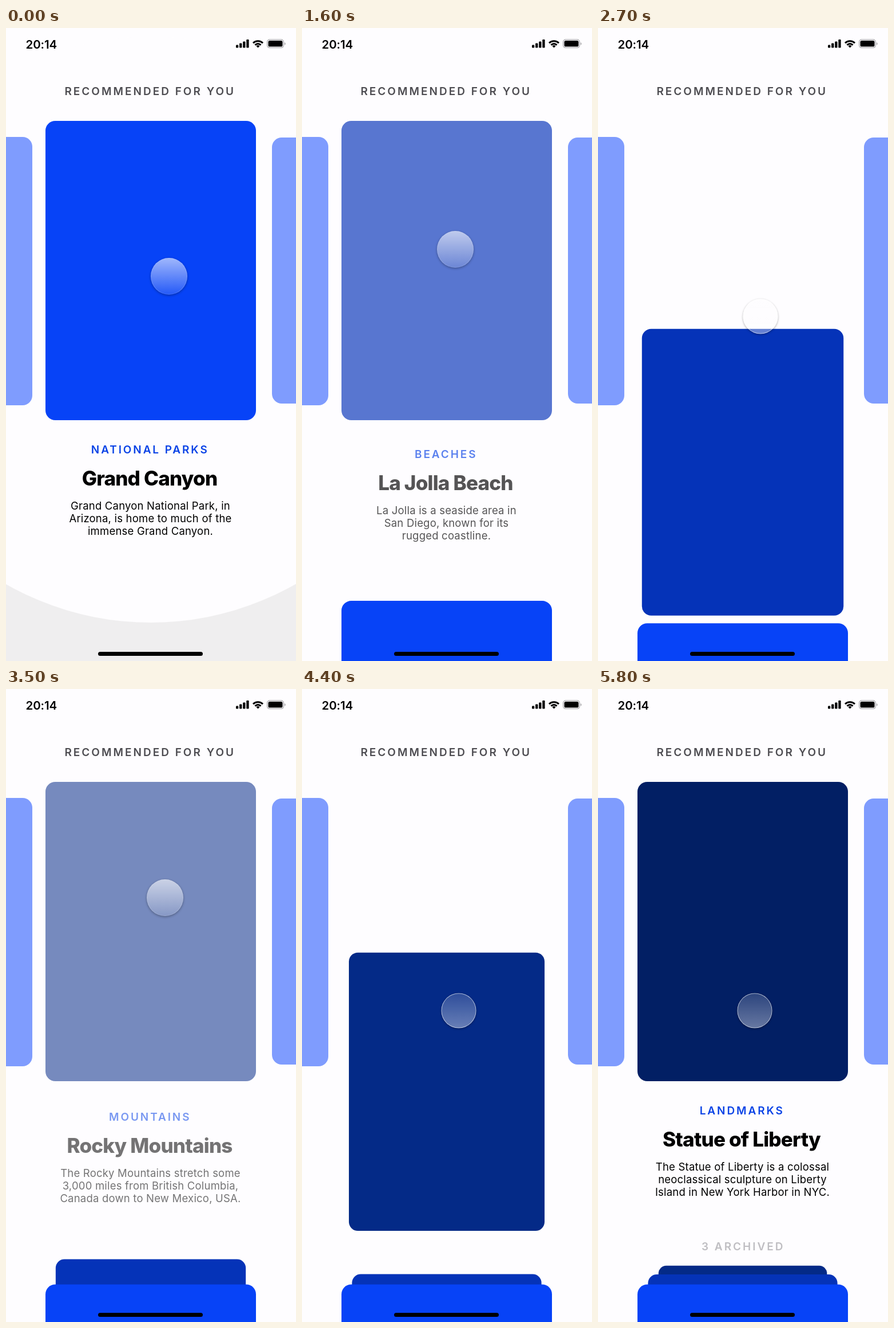
Write an HTML page that moves like this. It is 507 px wide and 1104 px high and loops after 5.9 s.

```html
<!DOCTYPE html>
<html lang="en">
<head>
<meta charset="utf-8">
<title>Recommended for you</title>
<style>
  html, body { margin: 0; width: 100%; height: 100%; overflow: hidden; background: #fefdff; }
  #stage {
    position: relative; width: 507px; height: 1104px; overflow: hidden;
    font-family: Inter, "Liberation Sans", sans-serif; color: #000;
  }
  #stage > * { position: absolute; }
  svg { left: 0; top: 0; }
  .caps {
    left: 0; width: 503.5px; height: 24px; line-height: 24px;
    text-align: center; font-size: 19px; letter-spacing: 3px; white-space: nowrap;
  }
  .header { top: 99px; font-weight: 600; color: #4d4c51; }
  .label { left: 2px; top: 961px; font-weight: 600; color: #bfbec2; }
  .time { left: 34.5px; top: 17px; line-height: 24px; font-size: 20.5px; font-weight: 600; letter-spacing: -.1px; }
  .side { width: 368px; background: #7f9cfe; border-radius: 17px; }
  .card {
    left: 68.7px; top: 0; width: 368.5px; height: 521.5px;
    border-radius: 17px; transform-origin: 50% 0;
  }
  .info { left: 0; top: 0; width: 506px; text-align: center; }
  .info > * { position: absolute; left: 0; margin: 0; white-space: nowrap; }
  .info .caps { top: 724px; font-weight: 600; letter-spacing: 2.9px; color: #0a43e6; }
  .info h1 { top: 763px; width: 502px; line-height: 44px; font-size: 35px; font-weight: 800; letter-spacing: -.8px; }
  .info p { top: 822px; width: 505px; line-height: 22px; font-size: 18.5px; letter-spacing: .2px; white-space: pre; }
  .home { left: 161px; top: 1087.5px; width: 183px; height: 7px; border-radius: 4px; background: #000; }
  #touch {
    left: 0; top: 0; width: 64px; height: 64px; border-radius: 50%; box-sizing: border-box;
    border: 1.5px solid rgba(255, 255, 255, var(--rim));
    background: linear-gradient(rgba(255, 255, 255, var(--hi)), rgba(255, 255, 255, var(--lo))) border-box;
    box-shadow: 0 1.5px 4px rgba(0, 0, 0, .32);
  }
</style>
</head>
<body>
<div id="stage">
  <svg width="507" height="1104">
    <rect y="900" width="507" height="204" fill="#efeeef"/>
    <circle id="bowl" cx="253" cy="526" r="511" fill="#fefdff"/>
  </svg>
  <div class="time">20:14</div>
  <svg width="507" height="50">
    <g id="bars"></g>
    <g fill="none" stroke="#000" stroke-width="3">
      <path d="M432 26.2a12 12 0 0 1 17 0"/>
      <path d="M435.4 29.7a7.2 7.2 0 0 1 10.2 0"/>
    </g>
    <path d="M440.5 34.5l-3-3.1a4.3 4.3 0 0 1 6 0z"/>
    <rect x="456.6" y="20.1" width="28.8" height="14.4" rx="4.4" fill="none" stroke="#a4a3a7" stroke-width="1.2"/>
    <rect x="458.5" y="22" width="25" height="10.6" rx="2.6"/>
    <path d="M487 25a2.6 2.6 0 0 1 0 4.8z" fill="#a4a3a7"/>
  </svg>
  <div class="caps header">RECOMMENDED FOR YOU</div>
  <div class="side" style="left:-322px;top:190px;height:467.5px"></div>
  <div class="side" style="left:464.5px;top:191px;height:464px"></div>
  <div class="caps label" id="label"></div>
  <div class="home"></div>
  <div id="touch"></div>
</div>
<script>
const LOOP = 5900, TOP = 162, SPRING = 4.95 / 1000, FADE = 400;
const stage = document.getElementById('stage');
const label = document.getElementById('label');
const touch = document.getElementById('touch');
const bowl = document.getElementById('bowl');
const home = document.querySelector('.home');

// show: fade-in start; drag/drop: gesture times; go: spring start; rest: archived top
const cards = [
  { color: '#0743f7', kind: 'NATIONAL PARKS', name: 'Grand Canyon',
    text: 'Grand Canyon National Park, in\nArizona, is home to much of the\nimmense Grand Canyon.',
    show: -1000, drag: 470, drop: 600, go: 645, rest: 1038.5, scale: 1 },
  { color: '#0533b8', kind: 'BEACHES', name: 'La Jolla Beach',
    text: 'La Jolla is a seaside area in\nSan Diego, known for its\nrugged coastline.',
    show: 1336, drag: 2360, drop: 2455, go: 2462, rest: 1021, scale: .9 },
  { color: '#042a87', kind: 'MOUNTAINS', name: 'Rocky Mountains',
    text: 'The Rocky Mountains stretch some\n3,000 miles from British Columbia,\nCanada down to New Mexico, USA.',
    show: 3284, drag: 4130, drop: 4254, go: 4260, rest: 1008.5, scale: .8 },
  { color: '#021f64', kind: 'LANDMARKS', name: 'Statue of Liberty',
    text: 'The Statue of Liberty is a colossal\nneoclassical sculpture on Liberty\nIsland in New York Harbor in NYC.',
    show: 5130, drag: 1e5, drop: 1e5, go: 1e5, rest: TOP, scale: 1 }
];

// pointer path: time, x, y
const path = [
  [0, 285, 433], [350, 272, 382], [470, 272, 382], [600, 266, 478], [1150, 266, 478],
  [1550, 268, 386], [2360, 270, 386], [2455, 284, 503], [2850, 284, 503],
  [3350, 278, 364], [4130, 278, 364], [4254, 274, 561], [LOOP, 274, 561]
];
const presses = [[370, 1150], [2260, 2850], [4030, 1e5]];

const clamp = v => Math.max(0, Math.min(1, v));
const ramp = (t, from, length) => clamp((t - from) / length);
const smooth = k => k * k * (3 - 2 * k);
const mix = (a, b, k) => a + (b - a) * k;

function add(tag, cls, parent, text = '') {
  const el = document.createElement(tag);
  el.className = cls;
  el.textContent = text;
  parent.append(el);
  return el;
}

for (const c of cards) {
  c.info = add('div', 'info', stage);
  add('div', 'caps', c.info, c.kind);
  add('h1', '', c.info, c.name);
  add('p', '', c.info, c.text);
}
for (const c of [...cards].reverse()) {
  c.el = add('div', 'card', stage);
  c.el.style.background = c.color;
}
stage.append(home, touch);

document.getElementById('bars').innerHTML = [5, 8, 11, 14.5]
  .map((h, i) => `<rect x="${402 + i * 6.1}" y="${34.5 - h}" width="4.3" height="${h}" rx="1.2"/>`).join('');

function pointer(t) {
  const i = Math.max(1, path.findIndex(p => p[0] > t));
  const [a, b] = [path[i - 1], path[i]];
  const k = ramp(t, a[0], b[0] - a[0]);
  const e = cards.some(c => c.drag === a[0]) ? k * k : smooth(k);
  return [mix(a[1], b[1], e), mix(a[2], b[2], e)];
}

function cardTop(c, t) {
  if (t < c.drag) return TOP;
  const pulled = TOP + pointer(Math.min(t, c.drop))[1] - pointer(c.drag)[1];
  if (t < c.go) return pulled;
  const x = (t - c.go) * SPRING;
  return c.rest - (c.rest - pulled) * (1 + x) * Math.exp(-x);
}

function draw(t) {
  let note = 0, count = 0;
  cards.forEach((c, i) => {
    const shown = ramp(t, c.show, FADE);
    const top = cardTop(c, t);
    const scale = c.rest > TOP ? mix(1, c.scale, (top - TOP) / (c.rest - TOP)) : 1;
    c.el.style.opacity = shown;
    c.el.style.transform = `translateY(${top}px) scale(${scale})`;

    const seen = shown * (1 - ramp(t, c.drag, 150));
    c.info.style.opacity = seen;
    c.info.style.transform = `translateY(${25 * (1 - seen)}px)`;

    if (i && t > c.show) {
      count = i;
      note = ramp(t, c.show + 330, 250) * (1 - ramp(t, c.drag, 150));
    }
  });
  label.textContent = count + ' ARCHIVED';
  label.style.opacity = note;
  bowl.setAttribute('r', mix(511, 636, smooth(ramp(t, 400, 250))));

  const [x, y] = pointer(t);
  const press = Math.max(...presses.map(([on, off]) => ramp(t, on, 100) * (1 - ramp(t, off, 100))));
  touch.style.transform = `translate(${x - 32}px, ${y - 32}px) scale(${mix(1, .955, press)})`;
  touch.style.setProperty('--hi', mix(.62, .17, press));
  touch.style.setProperty('--lo', mix(.12, .4, press));
  touch.style.setProperty('--rim', mix(.15, .58, press));
}

function frame() {
  draw(performance.now() % LOOP);
  requestAnimationFrame(frame);
}
frame();
</script>
</body>
</html>
```
